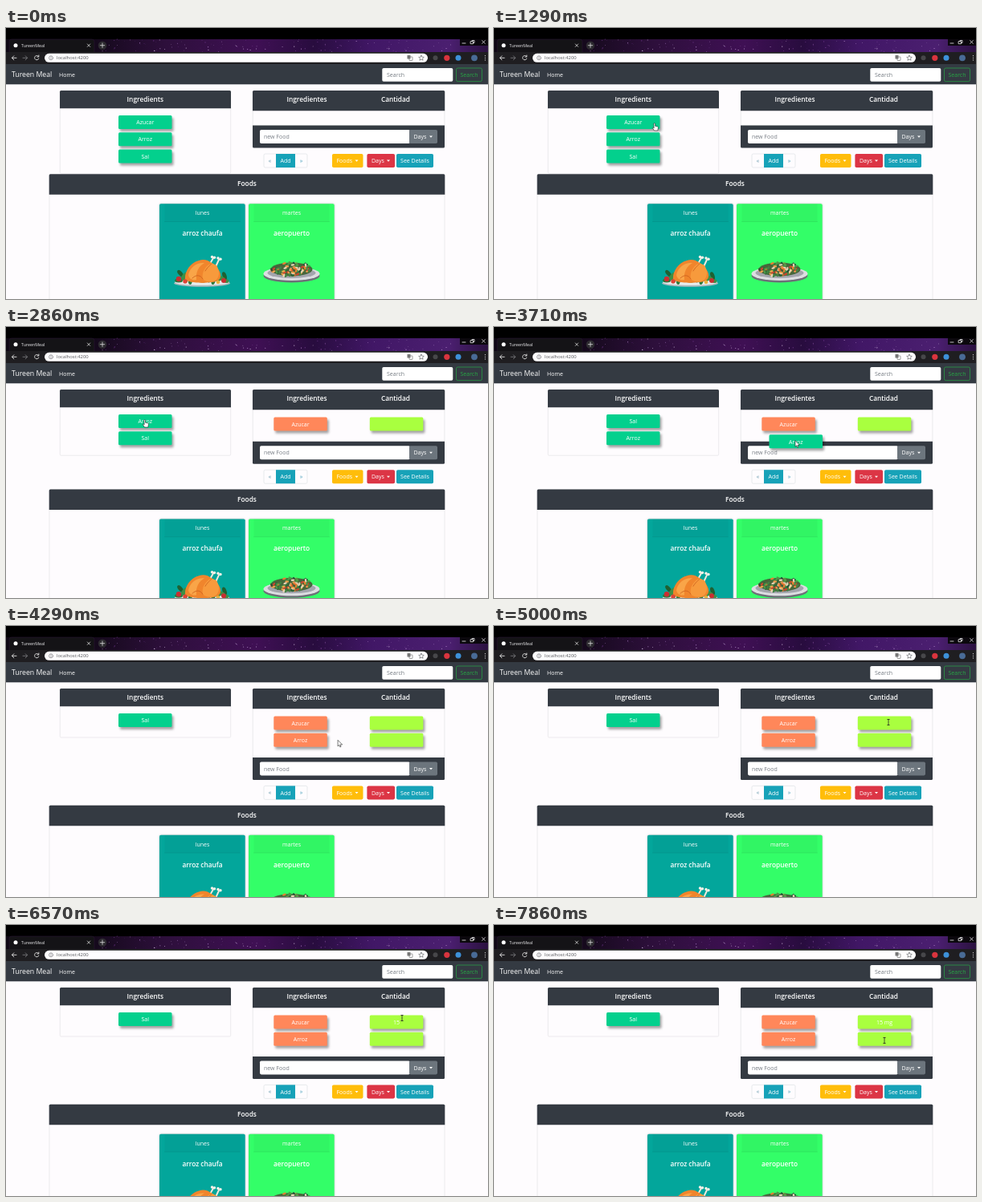
An HTML page for the animation above (8 s loop, 600 px wide and 338 px high).

```html
<!DOCTYPE html>
<html lang="en">
<head>
<meta charset="utf-8">
<title>Tureen Meal</title>
<style>
  html, body { margin: 0; height: 100%; overflow: hidden; background: #fefcfe; }
  svg { display: block; width: 100vw; height: 100vh; }
  text { font-family: "Open Sans", "Noto Sans", sans-serif; white-space: pre; }
  .chip { filter: drop-shadow(2.5px 3px 1.8px rgba(0, 0, 0, .36)); }
  .card { filter: drop-shadow(.7px .7px 1px rgba(0, 0, 0, .25)); }
</style>
</head>
<body>
<svg id="stage" viewBox="0 0 600 338" preserveAspectRatio="none"></svg>
<script>
const LOOP = 8000, ROW = 21.2, CHIP_W = 66.5, CHIP_H = 17;
const DARK = '#343a42', GREEN = '#03d08d', ORANGE = '#ff875a', LIME = '#a9ff3f', LINE = '#e4e3e6';

const rect = (x, y, w, h, fill, r = 0, extra = '') =>
  `<rect x="${x}" y="${y}" width="${w}" height="${h}" rx="${r}" fill="${fill}" ${extra}/>`;
const frame = (x, y, w, h, stroke = LINE, r = 1.5, id = '') =>
  rect(x, y, w, h, 'none', r, `stroke="${stroke}" stroke-width=".7" id="${id}"`);
const ellipse = (x, y, rx, ry, fill, turn = 0) =>
  `<ellipse cx="${x}" cy="${y}" rx="${rx}" ry="${ry}" fill="${fill}" transform="rotate(${turn} ${x} ${y})"/>`;
const dot = (x, y, r, fill) => ellipse(x, y, r, r, fill);
const path = (d, fill, stroke = 'none', width = 1) =>
  `<path d="${d}" fill="${fill}" stroke="${stroke}" stroke-width="${width}" stroke-linecap="round" stroke-linejoin="round"/>`;
const text = (x, y, label, size = 7, fill = '#fff', anchor = 'middle', weight = 400) =>
  `<text x="${x}" y="${y}" font-size="${size}" fill="${fill}" text-anchor="${anchor}" font-weight="${weight}">${label}</text>`;
const heading = (x, y, label) => text(x, y, label, 8.3, '#fff', 'middle', 600);
const button = (x, y, w, label, fill, color = '#fff') =>
  rect(x, y, w, 17, fill, 1.8) + text(x + w / 2, y + 11.2, label, 7, color);
const dropdown = (x, y, w, label, fill) =>
  rect(x, y, w, 17, fill, 1.8) + text(x + 5.5, y + 11.2, label, 7, '#fff', 'start') +
  path(`M${x + w - 10} ${y + 7.6}h4l-2 2.2z`, '#fff');
const header = (x, y, w, h) => path(`M${x} ${y + h}v${1.5 - h}q0-1.5 1.5-1.5h${w - 3}q1.5 0 1.5 1.5v${h - 1.5}z`, DARK);
const chip = (x, y, label, fill) =>
  rect(x, y, CHIP_W, CHIP_H, fill, 1.5, 'class="chip"') + text(x + CHIP_W / 2, y + 11.2, label);

let seed = 7;
const random = () => (seed = seed * 16807 % 2147483647) / 2147483647;
const repeat = (n, make) => Array.from({ length: n }, (_, i) => make(i)).join('');
const pick = list => list[Math.floor(random() * list.length)];

function browser() {
  const stars = repeat(120, () => dot(115 + random() * 445, 14 + random() * 15.5, .2 + random() * .4,
    pick(['#b98bd0', '#8a4aa6', '#d9c4e4', '#6c3488'])));
  return `<defs><linearGradient id="sky">
      <stop offset=".15" stop-color="#0f0814"/><stop offset=".33" stop-color="#2d0f3b"/>
      <stop offset=".52" stop-color="#3f1054"/><stop offset=".64" stop-color="#280c3e"/>
      <stop offset=".76" stop-color="#411766"/><stop offset=".92" stop-color="#4b1f70"/>
      <stop offset="1" stop-color="#2b1240"/></linearGradient></defs>` +
    rect(0, 0, 600, 14, '#000') + rect(0, 14, 600, 16.5, 'url(#sky)') + stars +
    path('M4 30.5V17q0-3 3-3h100q3 0 3 3v13.5z', '#141316', '#2c1738', .5) +
    dot(12, 21.7, 2.5, '#fff') + text(19, 23.7, 'TureenMeal', 5.3, '#e8e8ea', 'start') +
    dot(120, 21.7, 5.3, '#2d2b30') +
    path('M101.3 20l3.4 3.4m0-3.4l-3.4 3.4M117.3 21.7h5.4m-2.7-2.7v5.4', 'none', '#ddd', .8) +
    rect(565, 14, 35, 8, '#0b080d') +
    path('M568 19h4M592.7 15.7l3.6 3.6m0-3.6l-3.6 3.6M578.5 16.7h3v3h-3zM580 16.7v-1.200h3v3h-1.500', 'none', '#eee', .8) +
    rect(0, 30, 600, 15.5, '#1f1e21') +
    path('M13 37.3H7.5m2.300-2.500L7.400 37.3l2.400 2.500', 'none', '#e4e4e4', .9) +
    path('M21 37.3h5.500m-2.300-2.500l2.400 2.500-2.400 2.500', 'none', '#77777a', .9) +
    path('M40.5 35.5a2.7 2.7 0 1 0 .3 2.7M40.8 34v2h-2', 'none', '#e4e4e4', .9) +
    rect(48, 31.8, 477, 11, '#fefdfe', 5.5) +
    path('M58.5 37.3a2.5 2.5 0 1 1-5 0a2.5 2.5 0 1 1 5 0M56 37v1.4M56 35.9v.1', 'none', '#66666a', .6) +
    text(63, 39.4, 'localhost:4200', 5.9, '#55565a', 'start') +
    rect(499.5, 34, 4, 4.5, '#777', .5) + frame(502, 36, 4, 4.5, '#777', .5) +
    path('M517 34l1 2.2 2.3.2-1.800 1.600.6 2.300-2.100-1.200-2.100 1.200.6-2.300-1.800-1.600 2.300-.2z', 'none', '#55565a', .6) +
    dot(534.5, 37.3, 3, '#47474a') + dot(548.8, 37.3, 3.6, '#d9343e') +
    dot(563, 37.3, 3.5, '#3d91d9') + dot(583, 37.3, 3.9, '#496b96') +
    [34.7, 37.3, 39.9].map(y => dot(596.5, y, .6, '#ddd')).join('');
}

function navbar() {
  return rect(0, 45, 600, 25.3, DARK) +
    text(7, 61.3, 'Tureen Meal', 8.7, '#fff', 'start') + text(66, 61, 'Home', 7, '#fff', 'start') +
    rect(468.3, 50, 88, 16.7, '#fff', 1.8) + text(474, 61, 'Search', 7, '#777d84', 'start') +
    frame(560.5, 50, 32, 16.6, '#28a745', 1.8) + text(576.5, 61, 'Search', 7, '#28a745');
}

function roast() {
  const leaf = (x, y, turn) => ellipse(x, y, 5, 2.5, pick(['#2c7a3d', '#1e6132', '#3f8f45']), turn);
  return ellipse(244, 318.5, 35, 4.2, '#aeb9bf') + ellipse(244, 317, 34, 3.800, '#e8ecee') +
    repeat(9, i => leaf(215 + i * 7.2, 315 - i % 2 * 2, i * 47)) +
    leaf(217, 306, 50) + leaf(222, 309, -50) + leaf(272, 309, 70) + leaf(268, 312, 20) +
    path('M251 299L258 287M259 302L265 289', 'none', '#f3e9dc', 2) +
    [[256.5, 285.5], [259.5, 286.2], [264, 287], [267, 288.2]].map(([x, y]) => dot(x, y, 1.7, '#f8f1e8')).join('') +
    path('M223 314C222 304 229 293 240 290C248 287 255 291 260 297C267 302 270 310 264 315C255 319 231 319 223 314z', '#f0852c') +
    path('M227 308C229 298 238 292 247 293C240 297 236 304 237 314C232 315 228 313 227 308z', '#f9a548') +
    path('M245 313C243 304 249 296 256 293L262 296C267 304 266 313 258 316C253 317 247 316 245 313z', '#f79a3c') +
    path('M232 312C237 307 242 308 245 313M248 303C251 298 254 296 256 294', 'none', '#cf6420', .9) +
    dot(215, 313, 3.200, '#c92f32') + dot(223, 316, 2.700, '#df4437') +
    dot(271, 315, 3, '#c92f32') + dot(264, 317, 2.300, '#e8b13d');
}

function stirFry() {
  const greens = ['#2d6437', '#3f8542', '#28513a'], bits = ['#ee7d31', '#d1452f', '#f2a14d', '#4d9a48', '#e9d3b4'];
  return ellipse(355.5, 309, 35, 8.5, '#6d7078') + ellipse(355.5, 306.5, 35, 8.5, '#dcdde1') +
    ellipse(355.5, 305.5, 30, 6.5, '#a3a5ad') + ellipse(355.5, 301, 26, 8.5, '#47663b') +
    repeat(75, i => {
      const a = random() * 6.283, d = Math.sqrt(random());
      return ellipse(355.5 + Math.cos(a) * d * 25.5, 301 + Math.sin(a) * d * 8.5, 2.4, 1.2,
        pick(i % 3 ? bits : greens), random() * 180);
    });
}

const dayCard = (x, day, meal, fill, picture) =>
  `<g class="card">${rect(x, 219.2, 106.7, 140, fill, 1.8)}</g>` +
  rect(x + 6.5, 219.2, 94, 22.3, 'rgba(0,0,0,.035)') +
  path(`M${x + 6.5} 241.5h94`, 'none', 'rgba(0,0,0,.13)', .6) +
  text(x + 53.5, 233, day) + heading(x + 53.5, 259, meal) + picture;

function recipeFooter() {
  return path('M307 121.5h239v26.5q0 1.5-1.5 1.5h-236q-1.5 0-1.5-1.5z', DARK) +
    rect(316, 127, 187, 17, '#fff', 1.8) + text(321, 138.3, 'new Food', 7, '#777d84', 'start') +
    dropdown(502, 127, 35, 'Days', '#6c757d') +
    frame(321, 157, 54, 17, '#dee2e6', 1.8) +
    text(328.5, 168, '«', 7, '#6c9db0') + rect(336, 157, 24, 17, '#17a2b8') +
    text(348, 168.2, 'Add') + text(367.5, 168, '»', 7, '#4aa0bd') +
    dropdown(406, 157, 38.5, 'Foods', '#ffbd0a') + dropdown(449.4, 157, 34.6, 'Days', '#dc3545') +
    button(486, 157, 46, 'See Details', '#17a2b8');
}

function foodsPanel() {
  return frame(54, 182.3, 492, 200) + header(53.7, 182.3, 492.6, 25.5) + heading(300, 197.3, 'Foods') +
    dayCard(191, 'lunes', 'arroz chaufa', '#03a69b', roast()) +
    dayCard(302, 'martes', 'aeropuerto', '#33fe68', stirFry());
}

document.getElementById('stage').innerHTML =
  rect(0, 0, 600, 338, '#fefcfe') +
  frame(67.2, 78.3, 212.5, 103, LINE, 1.5, 'pantry') + header(67, 78, 213, 22.3) + heading(173.3, 92.3, 'Ingredients') +
  frame(307.2, 78.3, 238.7, 60, LINE, 1.5, 'recipe') + header(307, 78, 239.2, 25.3) +
  heading(374.5, 92.3, 'Ingredientes') + heading(485, 92.3, 'Cantidad') +
  `<g id="footer">${recipeFooter()}</g><g id="foods">${foodsPanel()}</g>` +
  browser() + navbar() + '<g id="live"></g>';

const [pantry, recipe, footer, foods, live] =
  ['pantry', 'recipe', 'footer', 'foods', 'live'].map(id => document.getElementById(id));

// Pointer track: time, x, y.
const track = [
  [650, 262, 345], [1200, 199, 119], [1290, 199, 119], [1430, 185, 116], [1500, 185, 116],
  [2000, 364, 113], [2250, 364, 114], [2850, 172, 116], [3000, 172, 116], [3280, 190, 139],
  [3710, 375, 142], [4000, 412, 143], [4250, 412, 143], [4850, 491, 120], [5300, 491, 120],
  [5800, 493, 116], [7250, 493, 116], [7650, 486, 144], [8000, 486, 144]
];
const drags = [
  { label: 'Azucar', start: 1480, enter: 1830, drop: 2220, dx: 45, dy: 7 },
  { label: 'Arroz', start: 2980, swap: 3220, enter: 3850, drop: 4200, dx: 32.5, dy: 7.7 }
];
const typing = [[5950, '1'], [6250, '15'], [6950, '15 '], [7090, '15 m'], [7230, '15 mg']];

function pointerAt(t) {
  const i = track.findIndex(p => p[0] > t);
  if (i < 1) return null;
  const [t0, x0, y0] = track[i - 1], [t1, x1, y1] = track[i];
  const k = (t - t0) / (t1 - t0), ease = k * k * (3 - 2 * k);
  return { x: x0 + (x1 - x0) * ease, y: y0 + (y1 - y0) * ease };
}

function pointerShape({ x, y }, dragging, listed) {
  const overPantry = x > 140 && x < 207 && y > 109 && y < 105 + listed * ROW;
  const overAmount = x > 453 && x < 520 && y > 112 && y < 152;
  let shape;
  if (!dragging && overPantry) {
    shape = path('M0 0q1-.8 1.6.2V3.2l3 .7q1 .4.8 1.5L4.8 9H.5L-1.8 5.5q.5-1 1.8 0z', '#fff', '#222', .6);
  } else if (!dragging && overAmount) {
    shape = path('M-1.2-3.5h2.4M0-3.5v7M-1.2 3.5h2.4', 'none', '#222', .8);
  } else {
    shape = path('M0 0v7.3l1.7-1.5 1.1 2.5 1.2-.5-1.1-2.5h2.3z', '#fff', '#222', .6);
  }
  return `<g transform="translate(${x} ${y})">${shape}</g>`;
}

const shiftDown = (node, y) => node.setAttribute('transform', `translate(0 ${y})`);

function draw(t) {
  const pointer = pointerAt(t);
  const active = drags.find(d => t >= d.start && t < d.drop);
  const moved = drags.filter(d => t >= d.enter);
  const list = ['Azucar', 'Arroz', 'Sal'].filter(name => !moved.some(d => d.label === name));
  if (t >= drags[1].swap && list.length === 2) list.reverse();
  const amount = typing.reduce((value, [at, typed]) => t >= at ? typed : value, '');

  // The food panel sits below the taller of the two columns.
  const shift = moved.length * ROW;
  shiftDown(footer, shift);
  shiftDown(foods, Math.max(0, shift - .9));
  pantry.setAttribute('height', 60.7 + (list.length - 1) * ROW);
  recipe.setAttribute('height', 44 + shift);

  let out = list.map((name, i) => chip(140, 109 + i * ROW, name, GREEN)).join('');
  moved.forEach((d, i) => {
    const y = 112.5 + i * ROW;
    out += d === active ? chip(393, y, d.label, GREEN)
      : chip(333.3, y, d.label, ORANGE) + chip(452.8, y, i ? '' : amount, LIME);
  });
  if (active) out += chip(pointer.x - active.dx, pointer.y - active.dy, active.label, GREEN);
  if (pointer) out += pointerShape(pointer, active, list.length);
  live.innerHTML = out;
}

function tick() {
  draw(performance.now() % LOOP);
  requestAnimationFrame(tick);
}
tick();
</script>
</body>
</html>
```
